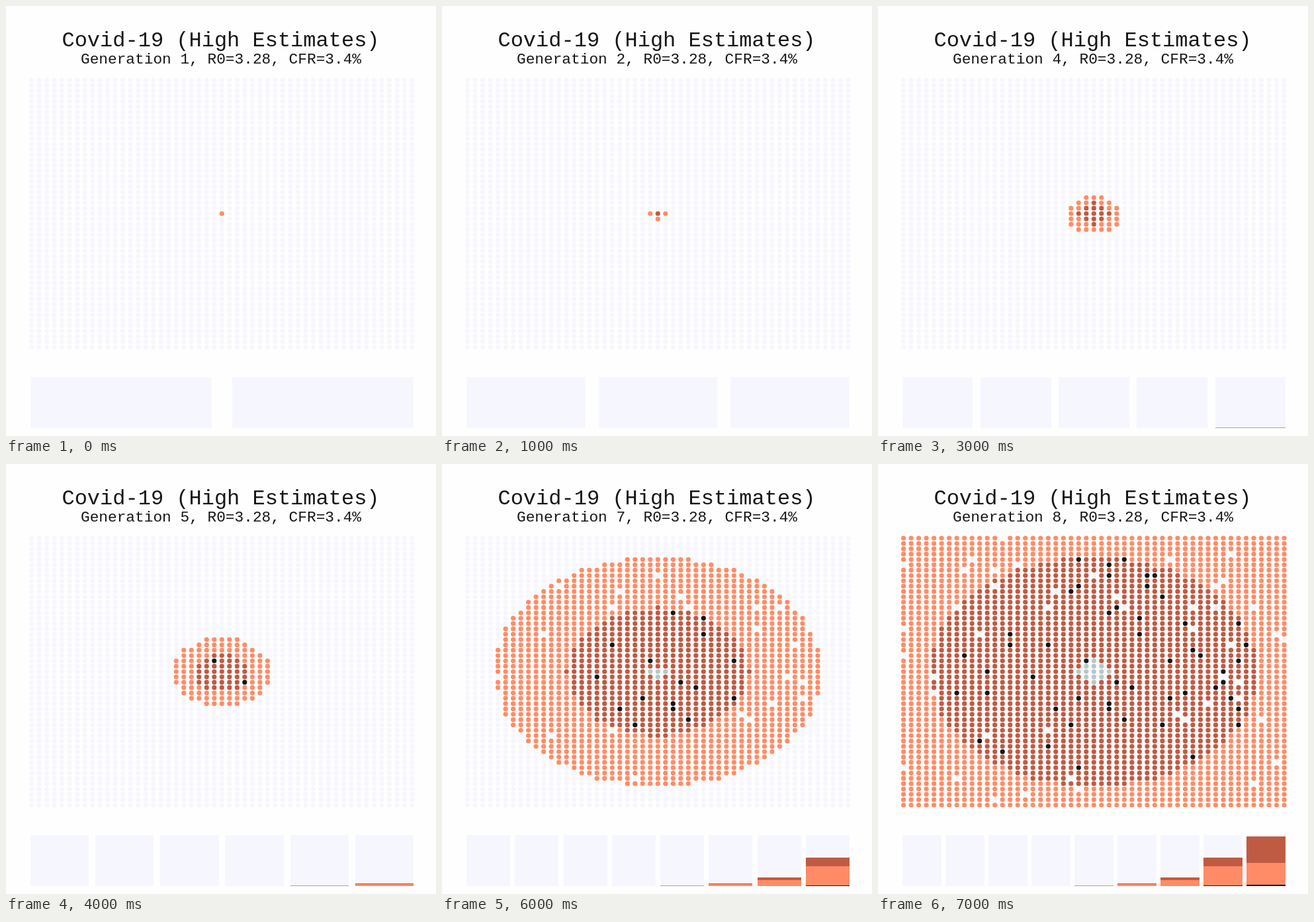
These frames come from a looping animation (650 px wide and 650 px high, 8 s). An HTML page:

```html
<!DOCTYPE html>
<html lang="en">
<head>
<meta charset="utf-8">
<title>Covid-19 spread by generation</title>
<style>
  html, body { margin: 0; width: 100%; height: 100%; overflow: hidden; background: #fefefe; }
  svg { display: block; width: 650px; height: 650px; }
  text { font-family: "Liberation Mono", monospace; fill: #161616; text-anchor: middle; }
</style>
</head>
<body>
<svg viewBox="0 0 650 650">
  <rect width="650" height="650" fill="#fefefe"/>
  <text x="324.5" y="61" font-size="32">Covid-19 (High Estimates)</text>
  <text id="info" x="325" y="87" font-size="22.8"></text>
  <g id="dots"></g>
  <g id="bars" shape-rendering="crispEdges"></g>
</svg>
<script>
const NS = "http://www.w3.org/2000/svg";
const STEP = 1000, GENS = 8, HALF = 25;
const PALE = "#f6f6ff", NEW = "#ff8c66", OLD = "#bf5b43", DEAD = "#141414", WELL = "#b6c8cb";

// The last cell reached in each generation, as offsets from the centre.
const lastCell = [[0, 0], [1, 0], [0, -2], [3, 2], [-5, -4], [-8, 9], [-20, -8]];

const byId = id => document.getElementById(id);

function add(parent, tag, attrs) {
  const el = document.createElementNS(NS, tag);
  for (const name in attrs) el.setAttribute(name, attrs[name]);
  return parent.appendChild(el);
}

let seed = 19;
function random() {
  seed = (seed * 1664525 + 1013904223) % 4294967296;
  return seed / 4294967296;
}

// Spread goes by distance; ties run from the bottom row up, left to right.
const order = ([ax, ay], [bx, by]) =>
  ax * ax + ay * ay - bx * bx - by * by || by - ay || ax - bx;

const places = [];
for (let y = -HALF; y <= HALF; y++)
  for (let x = -HALF; x <= HALF; x++) places.push([x, y]);
places.sort(order);

// One random rank out of every run of the given length.
function pick(first, run) {
  const ranks = new Set();
  for (let i = first; i < places.length; i += run) ranks.add(i + Math.floor(random() * run));
  return ranks;
}
const fatal = pick(13, 27), immune = pick(444, 46);

const cells = places.map(([x, y], rank) => {
  const ring = lastCell.findIndex(last => order([x, y], last) <= 0);
  const dot = add(byId("dots"), "circle", {
    cx: (326.3 + x * 11.51).toFixed(2), cy: (313.75 + y * 8.07).toFixed(2), r: 3.6
  });
  const born = immune.has(rank) ? Infinity : ring < 0 ? GENS : ring + 1;
  return { born, dies: fatal.has(rank), dot };
});

function colorOf(cell, gen) {
  if (gen < cell.born) return PALE;
  if (gen === cell.born) return NEW;
  if (cell.dies) return DEAD;
  return gen - cell.born >= 5 ? WELL : OLD;
}

const counts = [];
for (let gen = 0; gen <= GENS; gen++) {
  const sum = { [DEAD]: 0, [NEW]: 0, [OLD]: 0, [WELL]: 0, [PALE]: 0 };
  for (const cell of cells) sum[colorOf(cell, gen)]++;
  counts.push(sum);
}

function drawBar(x, width, sum) {
  const top = 561, floor = 638, scale = (floor - top) / cells.length;
  const block = (y, height, fill) => add(byId("bars"), "rect", { x, y, width, height, fill });
  block(top, floor - top, PALE);
  const size = (sum[DEAD] + sum[NEW] + sum[OLD]) * scale;
  if (size < 0.5) return;
  if (size < 1.5) {
    block(floor - 1, 1, "#a5a5a8");
    return;
  }
  let total = 0, low = floor;
  for (const color of [DEAD, NEW, OLD]) {
    total += sum[color] * scale;
    const high = Math.floor(floor - total + 0.4);
    block(high, low - high, color);
    low = high;
  }
}

function draw(gen) {
  byId("info").textContent = `Generation ${gen}, R0=3.28, CFR=3.4%`;
  for (const cell of cells) cell.dot.setAttribute("fill", colorOf(cell, gen));
  byId("bars").replaceChildren();
  const pitch = 579 / (gen + 0.9);
  for (let i = 0; i <= gen; i++) drawBar(37 + i * pitch, pitch * 0.9, counts[i]);
}

let shown = 0;
const start = performance.now();
function tick() {
  const time = (performance.now() - start) % (GENS * STEP);
  const gen = Math.floor(time / STEP) + 1;
  if (gen !== shown) draw(shown = gen);
  requestAnimationFrame(tick);
}
tick();
</script>
</body>
</html>
```
